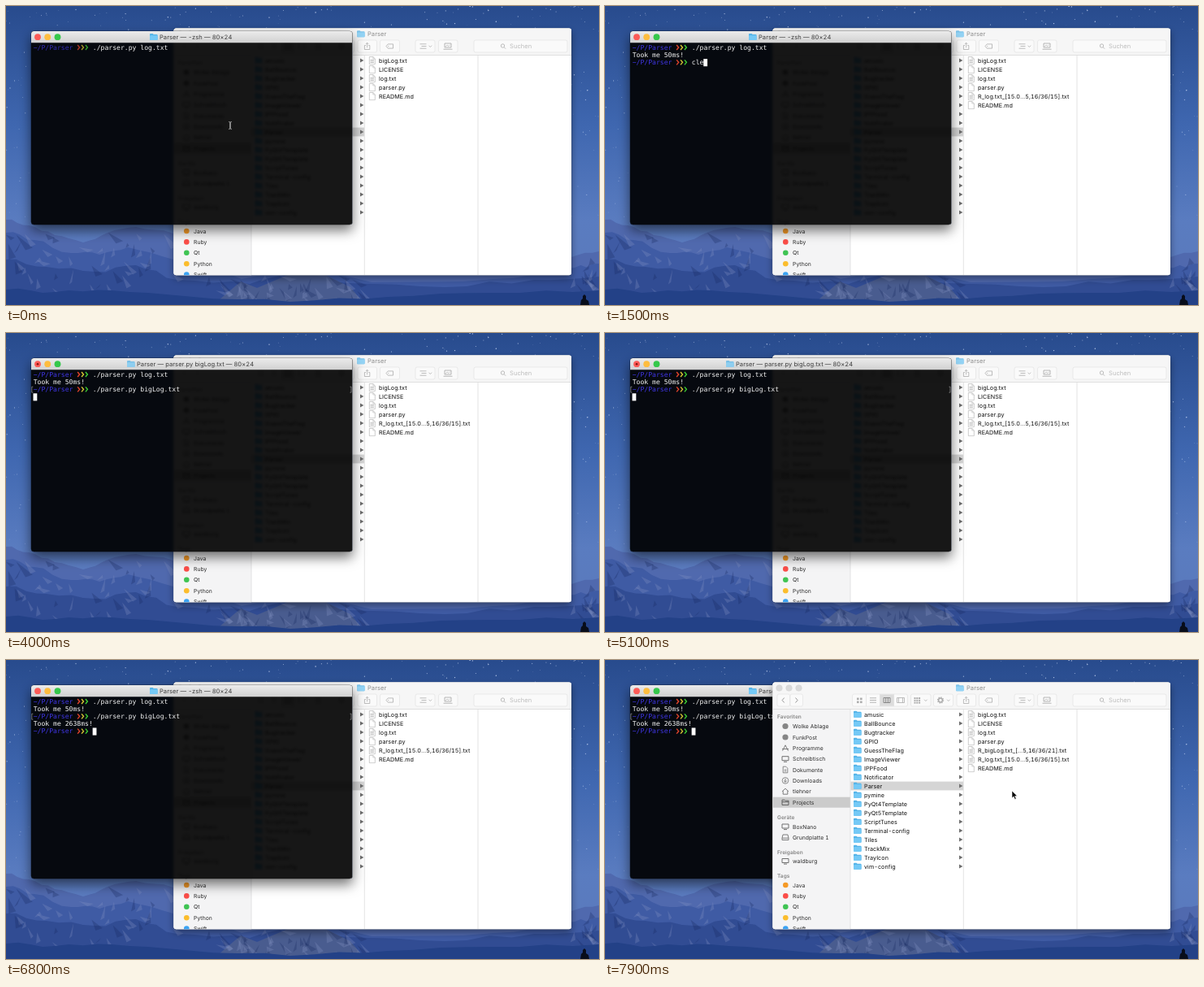
An HTML page for the animation above (8 s loop, 730x368 px).

```html
<!DOCTYPE html>
<html lang="de">
<head>
<meta charset="utf-8">
<title>Parser</title>
<style>
  html, body { margin: 0; width: 100%; height: 100%; overflow: hidden; background: #2c4f90; }
  svg { display: block; width: 730px; height: 368px; }
  text { font-family: Inter, Roboto, sans-serif; font-size: 7.2px; font-variant-numeric: tabular-nums; letter-spacing: .05px; text-rendering: geometricPrecision; white-space: pre; }
  .side { font-size: 6.8px; fill: #2b2b2b; }
  .head { font-size: 6.5px; font-weight: 600; fill: #858585; }
  .title { font-size: 7.55px; }
  .mono { font-family: "DejaVu Sans Mono", "Noto Sans Mono", monospace; font-size: 8.1px; letter-spacing: 0; fill: #f4f4f4; }
</style>
</head>
<body>
<svg id="stage" viewBox="0 0 730 368" xmlns="http://www.w3.org/2000/svg"></svg>
<script>
const LOOP = 8000, COL = 4.876, LEFT = 33.7, ROW = 11;
const stage = document.getElementById('stage');
const $ = id => document.getElementById(id);

const rect = (x, y, w, h, fill, more = '') =>
  `<rect x="${x}" y="${y}" width="${w}" height="${h}" fill="${fill}" ${more}/>`;
const dot = (x, y, r, fill, more = '') => `<circle cx="${x}" cy="${y}" r="${r}" fill="${fill}" ${more}/>`;
const line = (d, color, w = 0.8, more = '') =>
  `<path d="${d}" fill="none" stroke="${color}" stroke-width="${w}" ${more}/>`;
const fill = (d, color, more = '') => `<path d="${d}" fill="${color}" ${more}/>`;
const label = (x, y, s, more = '') => `<text x="${x}" y="${y}" ${more}>${s}</text>`;
const folder = (x, y) =>
  fill(`M${x} ${y + 1}q0-1 1-1h2.6l1 1.1h4q1 0 1 1v5q0 1-1 1h-7.6q-1 0-1-1z`, '#55b4e8') +
  rect(x, y + 2.2, 9.6, 5.9, '#74c9f6', 'rx=".8"');

function random(seed) {
  return () => (seed = (seed * 16807) % 2147483647) / 2147483647;
}

// Jagged ridge through a few anchor points, closed along the bottom edge.
function ridge(points, color, rough, seed) {
  const rnd = random(seed);
  let d = `M${points[0]}`;
  for (let i = 1; i < points.length; i++) {
    const [x0, y0] = points[i - 1], [x1, y1] = points[i];
    for (let k = 1; k <= 4; k++) {
      const p = k / 4, jag = k < 4 ? (rnd() - 0.5) * rough : 0;
      d += `L${(x0 + (x1 - x0) * p).toFixed(1)} ${(y0 + (y1 - y0) * p + jag).toFixed(1)}`;
    }
  }
  return fill(d + 'V368H0z', color);
}

// Slanted slivers of light and shade that roughen a slope.
function facets(count, x, y, w, h, seed) {
  const rnd = random(seed);
  let s = '';
  for (let i = 0; i < count; i++) {
    const px = x + rnd() * w, py = y + rnd() * h, len = 6 + rnd() * 14, lean = (rnd() - 0.4) * 22;
    s += fill(`M${px.toFixed(1)} ${py.toFixed(1)}l${lean.toFixed(1)} ${len.toFixed(1)}l${(3 + rnd() * 6).toFixed(1)}-3z`,
      rnd() < 0.5 ? '#8796c4' : '#14295c', 'opacity=".28"');
  }
  return s;
}

function desktop() {
  const rnd = random(77);
  let s = rect(0, 0, 730, 368, 'url(#sky)');
  for (let i = 0; i < 520; i++) {
    const x = rnd() * 730, y = rnd() ** 1.3 * 262;
    s += dot(x.toFixed(1), y.toFixed(1), (0.3 + rnd() * 0.42).toFixed(2), '#dbe7ff', `opacity="${(0.3 + rnd() * 0.65).toFixed(2)}"`);
  }
  return s +
    ridge([[0, 263], [28, 270], [60, 282], [95, 291], [125, 279], [160, 272], [206, 280], [480, 318], [640, 320], [696, 309], [730, 302]], '#5069ae', 4, 5) +
    ridge([[0, 279], [35, 288], [80, 304], [115, 306], [150, 297], [206, 312], [290, 336], [365, 322], [450, 340], [600, 336], [700, 322], [730, 317]], '#3f5ba4', 6, 9) +
    ridge([[0, 312], [50, 321], [110, 327], [160, 319], [210, 337], [300, 342], [360, 329], [420, 341], [540, 346], [650, 337], [730, 333]], '#314c93', 5, 21) +
    facets(46, 0, 278, 205, 70, 8) + facets(14, 697, 310, 30, 45, 15) +
    fill('M255 368l34-29 20 8 38-16h46l31 15 18 22z', '#4f618f', 'opacity=".8"') + facets(46, 250, 331, 190, 30, 31) +
    ridge([[0, 349], [60, 352], [130, 350], [220, 357], [350, 364], [470, 358], [600, 353], [730, 350]], '#234187', 4, 33) +
    fill('M707 368l1-6 2-2v-3l2-2 2 2v4l3 2 1 5z', '#080d1a');
}

const folders = ['amusic', 'BallBounce', 'Bugtracker', 'GPIO', 'GuessTheFlag', 'ImageViewer', 'IPPFood',
  'Notificator', 'Parser', 'pymine', 'PyQt4Template', 'PyQt5Template', 'ScriptTunes', 'Terminal-config',
  'Tiles', 'TrackMix', 'TrayIcon', 'vim-config'];

const heads = [['Favoriten', 70], ['Geräte', 193.5], ['Freigaben', 237], ['Tags', 265.5]];
const places = [['Wolke Ablage', 81.5, 'dot'], ['FunkPost', 95, 'dot'], ['Programme', 108.3, 'app'],
  ['Schreibtisch', 121.7, 'screen'], ['Dokumente', 135, 'page'], ['Downloads', 148.4, 'down'],
  ['tlehner', 161.8, 'home'], ['Projects', 175.2, 'folder'], ['BoxNano', 205, 'screen'],
  ['Grundplatte 1', 218.2, 'disk'], ['waldburg', 247.5, 'screen']];
const tags = [['Java', '#f59a27'], ['Ruby', '#fb4d48'], ['Qt', '#3fc453'], ['Python', '#fbbd2d'], ['Swift', '#3ba3f3']];

function sideIcon(kind, y) {
  const c = '#707070', x = 222;
  const shapes = {
    dot: () => dot(x, y, 3.6, '#858585'),
    app: () => line(`M${x - 3.5} ${y + 3.5}l3.5-7 3.5 7M${x - 4} ${y + 1.2}h8`, c, 0.9),
    screen: () => line(`M${x - 4} ${y - 3}h8v5h-8zM${x - 2} ${y + 3.6}h4`, c, 1),
    page: () => line(`M${x - 2.8} ${y - 3.8}h3.6l2 2v5.6h-5.6zM${x - 1.3} ${y}h2.6m-2.6 1.8h2.6`, c),
    down: () => line(`M${x} ${y - 2.2}v4m-1.8-1.6l1.8 1.8 1.8-1.8`, c, 0.9) + dot(x, y, 3.8, 'none', `stroke="${c}" stroke-width=".8"`),
    home: () => line(`M${x - 4} ${y}l4-3.6 4 3.6M${x - 2.8} ${y - 0.6}v4h5.6v-4`, c, 0.9),
    folder: () => line(`M${x - 4} ${y - 3}h3l1 1h4v5.2h-8zM${x - 4} ${y - 0.5}h8`, '#555', 0.9),
    disk: () => line(`M${x - 3} ${y - 3.2}h6l1 4.2v2.3h-8v-2.3zm-1 4.2h8`, c, 0.9)
  };
  return shapes[kind]();
}

function toolbar() {
  const g = '#adadad', edge = 'rx="2" stroke="#e2e2e2" stroke-width=".7"';
  const button = (x, w) => rect(x, 42, w, 15, '#fafafa', edge);
  let s = button(212, 15.5) + button(228, 15.5) + button(304.5, 68) + rect(338.5, 42.3, 17, 14.4, '#dcdcdc') +
    button(376.5, 24.5) + button(404.5, 24) + button(433, 23.5) + button(460.5, 24) + button(504, 24) + button(532.5, 23.5) +
    button(576, 115);
  s += line('M220.7 46.5l-2.6 3 2.6 3M234.5 46.5l2.6 3-2.6 3', '#8b8b8b', 0.9);
  s += line('M321.5 42v15M338.5 42v15M355.5 42v15', '#dedede', 0.7);
  for (const y of [46.5, 50.5]) for (const x of [310, 314]) s += rect(x, y, 2.6, 2.6, g);
  s += line('M326 46.8h8m-8 2.7h8m-8 2.7h8', g, 0.9);
  s += line('M343 46.5h8v6h-8zm2.7 0v6m2.7-6v6', '#777', 0.8);
  s += line('M359.5 46.5h9v6h-9zm2 0v6m5-6v6', g, 0.8);
  for (const y of [46, 48.8, 51.6]) for (const x of [380.5, 383.3, 386.1]) s += rect(x, y, 2, 2, g);
  s += line('M393 48.7l1.8 1.8 1.8-1.8M421 48.7l1.8 1.8 1.8-1.8M520.5 48.7l1.8 1.8 1.8-1.8', g, 0.8);
  s += dot(413, 49.5, 2.4, 'none', `stroke="${g}" stroke-width="1.5"`) + dot(413, 49.5, 3.6, 'none', `stroke="${g}" stroke-width="1.2" stroke-dasharray="1.4"`);
  s += line('M443 48.5h-1.6v5h6.4v-5h-1.6M444.6 51.3v-6m-1.7 1.6l1.7-1.7 1.7 1.7', g);
  s += line('M468 49.5l2.2-2.6h6.3v5.2h-6.3z', g) + dot(470.8, 49.5, 0.6, g);
  s += line('M509.5 46.8h8m-6 2.7h6m-8 2.7h8', g, 0.8);
  s += line('M540 46h8v5h-8zm-1.5 7.2h11', g, 0.9) + line('M541 50l2-2 2 1.5 2-2', g, 0.6);
  s += dot(611.5, 49, 2.2, 'none', `stroke="${g}" stroke-width=".8"`) + line('M613.1 50.7l2 2', g);
  return s + label(620, 52.2, 'Suchen', 'class="title" fill="#bdbdbd"');
}

function finderChrome() {
  let s = rect(206.5, 27.5, 489.5, 303.8, '#fff', 'rx="3"') +
    fill('M206.5 60.5V30.5q0-3 3-3H693q3 0 3 3v30z', '#f6f6f6') +
    fill('M206.5 60.5H302V331.3H209.5q-3 0-3-3z', '#f4f4f5') +
    line('M206.5 60.5H696', '#d8d8d8', 0.8) + line('M302 60.5V331M441.3 60.5V331M581 60.5V331', '#dcdcdc', 0.8);
  for (const x of [214.5, 226.5, 238.5]) s += dot(x, 34.5, 3.8, '#dadada', 'stroke="#cfcfcf" stroke-width=".4"');
  s += `<g opacity=".75">${folder(432, 30.2)}</g>` + label(445, 37.2, 'Parser', 'class="title" fill="#8d8d8d"') + toolbar();
  s += rect(206.5, 168.7, 95.3, 13, '#cbcbcb') + rect(302.4, 149.6, 138.6, 10.8, '#d5d5d5');
  for (const [name, y] of heads) s += label(212, y + 2.3, name, 'class="head"');
  for (const [name, y, kind] of places) s += sideIcon(kind, y) + label(231, y + 2.5, name, 'class="side"');
  s += '<g clip-path="url(#pane)">';
  tags.forEach(([name, color], i) => {
    const y = 277 + i * 13.4;
    s += dot(222.3, y, 3.3, color) + label(231, y + 2.5, name, 'class="side"');
  });
  s += '</g>';
  folders.forEach((name, i) => {
    const y = 67 + i * ROW;
    s += folder(306, y - 4.3) + label(319, y + 2.6, name, 'fill="#111"') + fill(`M436 ${y - 2.5}l4.4 2.5-4.4 2.5z`, '#6d6d6d');
  });
  return s;
}

// grow: time at which the row starts to slide in
const files = [
  { name: 'bigLog.txt', lines: true }, { name: 'LICENSE' }, { name: 'log.txt', lines: true }, { name: 'parser.py' },
  { name: 'R_bigLog.txt_[…5,16/36/21].txt', lines: true, grow: 6900 },
  { name: 'R_log.txt_[15.0…5,16/36/15].txt', lines: true, grow: 800 },
  { name: 'README.md' }
];

function fileRow(f, i) {
  const icon = fill('M447.3 1h4.6l2.4 2.4v6.8h-7z', '#fff', 'stroke="#a9a9a9" stroke-width=".6"') +
    line('M451.8 1v2.5h2.5', '#a9a9a9', 0.5) + (f.lines ? line('M448.5 4.8h4.4m-4.4 1.6h4.4m-4.4 1.6h4.4', '#999', 0.6) : '');
  return `<svg id="file${i}" x="0" width="730" height="11" overflow="hidden"><g id="slide${i}">${icon}${label(459, 8.1, f.name, 'fill="#111"')}</g></svg>`;
}

const base = row => 53.8 + row * 9.17;
function prompt(row) {
  const y = base(row) - 2.8;
  const chevrons = ['#e8452c', '#dccb35', '#3fd436'].map((c, i) =>
    line(`M${LEFT + (11 + i) * COL + 0.8} ${y - 3}l2.5 3-2.5 3`, c, 1.35)).join('');
  return `<g id="prompt${row}">${label(LEFT, base(row), '~/P/Parser', 'class="mono" style="fill:#4036e6"')}${chevrons}</g>`;
}
const typed = (id, row, col, s = '') => label(LEFT + col * COL, base(row), s, `class="mono" id="${id}"`);

function terminal() {
  return rect(31, 31, 395.5, 238, '#0a0a0a', 'rx="3.5" filter="url(#shadow)" stroke="#000" stroke-opacity=".45" stroke-width="1"') +
    '<g clip-path="url(#body)">' + rect(31, 45, 395.5, 224, '#4568aa') +
    '<use href="#chrome" filter="url(#blur)"/>' + rect(31, 45, 395.5, 224, '#000', 'opacity=".91"') + '</g>' +
    fill('M31 45.2V34.5q0-3.5 3.5-3.5H423q3.5 0 3.5 3.5v10.7z', 'url(#bar)') +
    dot(39, 38.2, 3.9, '#fc5b57') + dot(51.2, 38.2, 3.9, '#fdbd3f') + dot(63.5, 38.2, 3.9, '#35c84b') +
    dot(39, 38.2, 1.3, '#7e150f', 'id="busy"') +
    `<g id="icon">${folder(0, 34)}</g>` + label(189, 40.8, '', 'id="title" class="title" fill="#3c3c3c"') +
    prompt(0) + typed('cmd0', 0, 15, './parser.py log.txt') + typed('out0', 1, 0, 'Took me 50ms!') +
    prompt(2) + typed('cmd1', 2, 15) + typed('out1', 3, 0, 'Took me 2638ms!') + prompt(4) +
    `<g id="mark">${line('M33.3 66.2h-1.5v7h1.5M423.5 66.2h1.5v7h-1.5', '#8d8d8d', 0.8)}</g>` +
    rect(0, 0, 4.8, 9.1, '#fff', 'id="caret"');
}

stage.innerHTML = `<defs>
  <linearGradient id="sky" x2="0" y2="1"><stop offset="0" stop-color="#284b8d"/><stop offset=".4" stop-color="#3f67b0"/><stop offset=".72" stop-color="#5a7cc0"/><stop offset="1" stop-color="#5a78ba"/></linearGradient>
  <linearGradient id="bar" x2="0" y2="1"><stop offset="0" stop-color="#ebebeb"/><stop offset="1" stop-color="#d1d1d1"/></linearGradient>
  <filter id="shadow" x="-20%" y="-20%" width="140%" height="150%"><feDropShadow dx="0" dy="7" stdDeviation="7.5" flood-opacity=".55"/></filter>
  <filter id="soft" x="-10%" y="-10%" width="120%" height="125%"><feDropShadow dx="0" dy="4" stdDeviation="5" flood-opacity=".4"/></filter>
  <filter id="blur"><feGaussianBlur stdDeviation="1.6"/></filter>
  <clipPath id="body"><path d="M31 45H426.5V265.5q0 3.5-3.5 3.5H34.5q-3.5 0-3.5-3.5z"/></clipPath>
  <clipPath id="pane"><path d="M206.5 60.5H302V331.3H206.5z"/></clipPath>
</defs>
${desktop()}
<g id="windows">
  <g id="finder">${rect(206.5, 27.5, 489.5, 303.8, '#fff', 'rx="3" filter="url(#soft)" stroke="#000" stroke-opacity=".25" stroke-width="1"')}<g id="chrome">${finderChrome()}</g>${files.map(fileRow).join('')}</g>
  <g id="terminal">${terminal()}</g>
</g>
<g id="beam">${line('M-1.8-4.5q1.8 0 1.8 1.2v6.6q0 1.2-1.8 1.2M1.8-4.5q-1.8 0-1.8 1.2v6.6q0 1.2 1.8 1.2', '#c9c9c9', 0.8)}</g>
<g id="arrow">${fill('M0 0v9l2.1-1.9 1.5 3.4 1.6-.7-1.5-3.3h2.8z', '#000', 'stroke="#fff" stroke-width=".6"')}</g>`;

const ease = p => (p = Math.max(0, Math.min(1, p)), p * p * (3 - 2 * p));
const show = (id, on) => $(id).setAttribute('visibility', on ? 'visible' : 'hidden');
const move = (id, x, y) => $(id).setAttribute('transform', `translate(${x.toFixed(2)} ${y.toFixed(2)})`);
const within = (t, a, b) => t >= a && t < b;

function command(t) {
  if (t < 1300) return '';
  if (t < 3100) return 'clear'.slice(0, (t - 1300) / 100 + 1);
  if (t < 3200) return '';
  return t < 3300 ? './parser.py log.txt' : './parser.py bigLog.txt';
}

function caretAt(t, cmd) {
  if (t < 400) return null;
  if (t < 500) return [1, 0];
  if (t < 3800) return [2, 15 + cmd.length];
  if (t >= 6500) return [4, 15];
  return within(t, 4400, 5100) || t >= 5700 ? null : [3, 0];
}

function drawFiles(t) {
  let y = 61.5;
  files.forEach((f, i) => {
    const h = f.grow ? ROW * ease((t - f.grow) / 300) : ROW;
    const row = $('file' + i);
    row.setAttribute('y', y);
    row.setAttribute('height', h);
    row.setAttribute('display', h ? 'inline' : 'none');
    move('slide' + i, 0, h - ROW);
    y += h;
  });
}

function drawMouse(t) {
  const p = ease((t - 7400) / 300);
  const x = 276 + 225 * p, y = 147 + 14 * p, over = x < 427;
  show('beam', t < 400 || (t >= 7400 && over));
  show('arrow', t >= 7400 && !over);
  move('beam', x, y);
  move('arrow', x, y);
}

function draw(t) {
  const cmd = command(t), busy = within(t, 3800, 6500), caret = caretAt(t, cmd);
  $('title').textContent = busy ? 'Parser — parser.py bigLog.txt — 80×24' : 'Parser — -zsh — 80×24';
  const x = busy ? 161 : 189;
  $('title').setAttribute('x', x);
  move('icon', x - 12, 0);
  $('icon').setAttribute('opacity', busy ? 0.75 : 1);
  show('busy', busy);
  $('prompt0').setAttribute('opacity', t < 400 ? 0.75 : 1);
  $('cmd1').textContent = cmd;
  show('out0', t >= 500);
  show('prompt2', t >= 500);
  show('mark', t >= 3800);
  show('out1', t >= 6500);
  show('prompt4', t >= 6500);
  show('caret', caret);
  if (caret) move('caret', LEFT - 0.2 + caret[1] * COL, base(caret[0]) - 7);
  drawFiles(t);
  drawMouse(t);
  const front = $(t >= 7900 ? 'finder' : 'terminal');
  if ($('windows').lastElementChild !== front) $('windows').append(front);
}

let last = -1;
function tick(now) {
  const t = Math.floor((now % LOOP) / 100) * 100;
  if (t !== last) draw(last = t);
  requestAnimationFrame(tick);
}
draw(0);
requestAnimationFrame(tick);
</script>
</body>
</html>
```
